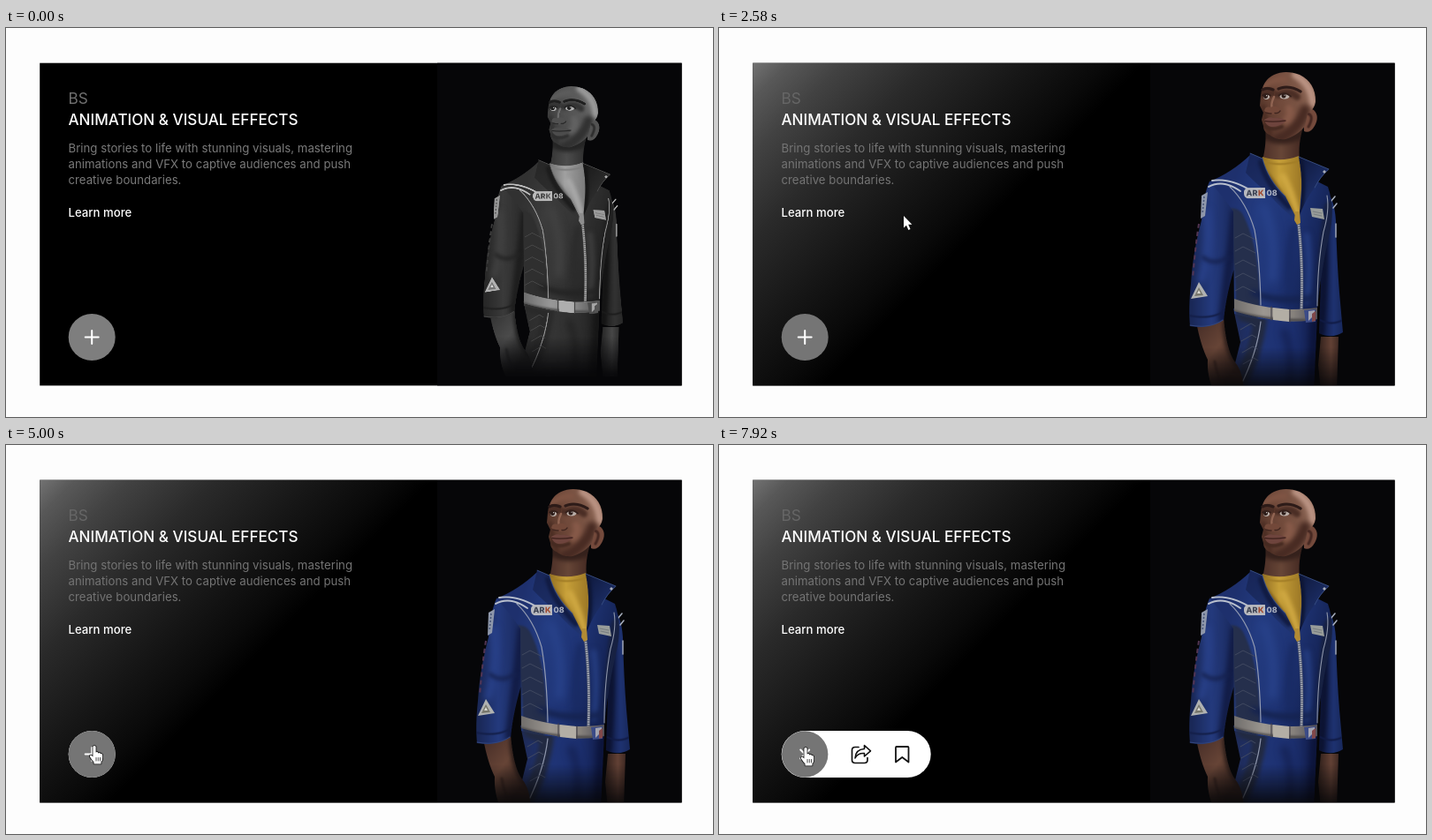
An HTML page with a canvas that plays this animation: 800 px wide and 441 px high, repeating every 8000 ms.

```html
<!DOCTYPE html>
<html lang="en">
<head>
<meta charset="utf-8">
<title>Card hover</title>
<style>
  html, body { margin: 0; width: 100%; height: 100%; overflow: hidden; background: #fdfdfd; }
  canvas { display: block; width: 800px; height: 441px; }
</style>
</head>
<body>
<canvas id="stage"></canvas>
<script>
const W = 800, H = 441, LOOP = 8000;
const FONT = 'Inter, "Open Sans", sans-serif';
const CARD = { x: 38.2, y: 39.7, w: 726.4, h: 365.7, split: 488 };
const BUTTON = { x: 97.2, y: 350.5, r: 26.5 };
const ZOOM = 1.1, PIVOT = { x: 619, y: 226 };

const dpr = window.devicePixelRatio || 1;
const canvas = document.getElementById('stage');
canvas.width = W * dpr;
canvas.height = H * dpr;
const ctx = canvas.getContext('2d');

const clamp = v => Math.max(0, Math.min(1, v));
const mix = (a, b, p) => a + (b - a) * p;
const ease = (t, start, length) => {
  const p = clamp((t - start) / length);
  return p * p * (3 - 2 * p);
};
const grey = v => `rgb(${v},${v},${v})`;

function ramp(c, x0, y0, x1, y1, ...stops) {
  const g = c.createLinearGradient(x0, y0, x1, y1);
  stops.forEach(([at, color]) => g.addColorStop(at, color));
  return g;
}

function fill(c, d, color) {
  c.fillStyle = color;
  c.fill(new Path2D(d));
}

function line(c, d, color, width = 1, dash = []) {
  c.strokeStyle = color;
  c.lineWidth = width;
  c.lineCap = c.lineJoin = dash.length ? 'butt' : 'round';
  if (dash.length) c.lineJoin = 'miter';
  c.setLineDash(dash);
  c.stroke(new Path2D(d));
  c.setLineDash([]);
}

// Fill a shape, then add blurred strokes that stay inside it.
function shaded(c, d, color, strokes = []) {
  fill(c, d, color);
  c.save();
  c.clip(new Path2D(d));
  for (const [path, tone, width, blur] of strokes) {
    c.filter = `blur(${blur}px)`;
    line(c, path, tone, width);
  }
  c.restore();
}

function drawLegs(c) {
  shaded(c, 'M582 318 L590 356 L578 404 L578 412 H673 L677 324 Z',
    ramp(c, 580, 0, 680, 0, [0, '#1f2a52'], [.35, '#203577'], [.7, '#1c2f6e'], [1, '#111b45']), [
      ['M594 325 L612 332 Q607 372 586 408', '#222a42', 16, 4],
      ['M640 345 Q650 370 646 404', '#162458', 9, 8],
      ['M676 326 L671 410', '#0c143a', 12, 8]
    ]);
  line(c, 'M613 333 Q609 368 590 406', '#8f97ad', 1.2);
  for (let i = 0; i < 4; i++) line(c, `M${590 + i} ${342 + i * 13} l12 -7 l5 3`, '#434b62', .8);
}

function drawHands(c) {
  shaded(c, 'M540 333 Q545 360 553 376 Q552 395 560 412 H594 Q593 390 584 379 Q574 366 571 329 Z',
    ramp(c, 540, 340, 590, 380, [0, '#4a3029'], [.5, '#674537'], [1, '#34221d']), [
      ['M574 335 Q575 370 592 386', '#2a1c19', 9, 5],
      ['M561 378 Q563 392 570 404', '#3c2720', 3, 2]
    ]);
  shaded(c, 'M681 350 L678 382 L681 412 H699 L701 350 Z',
    ramp(c, 678, 0, 702, 0, [0, '#2e1f1a'], [.6, '#624135'], [1, '#3d2822']));
}

function drawArms(c) {
  shaded(c, 'M555 174 Q548 190 546 218 Q536 255 534 290 Q531 318 533 338 Q555 342 571 331 Q574 300 585 266 L592 190 Z',
    ramp(c, 535, 0, 590, 0, [0, '#1a2857'], [.4, '#243a7d'], [1, '#182656']), [
      ['M584 210 Q579 260 570 330', '#121c46', 10, 6],
      ['M552 208 Q557 250 546 285', '#284088', 9, 7],
      ['M548 260 Q560 270 576 260', '#16224f', 4, 4],
      ['M532 326 Q556 331 572 321', '#141f49', 2, 1]
    ]);
  line(c, 'M533 337 Q556 341 570 331', '#33477e', .9);

  shaded(c, 'M684 182 Q696 190 698 218 Q699 262 702 300 L706 345 Q693 353 679 346 L681 290 Z',
    ramp(c, 680, 0, 706, 0, [0, '#0f183f'], [.6, '#1e3270'], [1, '#18285c']), [
      ['M685 230 Q686 290 681 345', '#0c1331', 8, 5],
      ['M680 331 Q693 338 706 331', '#111b45', 2, 1]
    ]);
  line(c, 'M692 197 L697 191 M695 204 L699 199', '#a9b0bf', 1.5);
  line(c, 'M698 222 V237', '#98a0b2', 1.6);

  // Sleeve marks and patches
  fill(c, 'M546 190 L553 186 L550 213 L545 216 Z', '#8f98ab');
  line(c, 'M549 191 L547 211', '#4b597a', 1.6, [2, 2]);
  line(c, 'M543 222 Q539 247 536 284', '#523553', 2, [5, 4]);
  fill(c, 'M543 288 L553 304 L534 307 Z', '#b0b2b1');
  fill(c, 'M543 294 L548 303 L538 304 Z', '#77776c');
  fill(c, 'M543 297 l2 4 h-4 Z', '#d8d8d2');
}

function drawTorso(c) {
  shaded(c, 'M601 144 Q580 164 555 174 Q568 188 582 208 L583 324 Q630 337 676 326 Q681 275 690 237 Q698 206 689 180 L661 166 Z',
    ramp(c, 580, 180, 695, 210, [0, '#1e306d'], [.3, '#243c81'], [.65, '#1f3475'], [1, '#142252']), [
      ['M581 218 Q600 255 598 322', '#252f4c', 27, 2],
      ['M694 205 Q685 260 686 320', '#172142', 19, 3],
      ['M650 228 Q642 265 648 314', '#192b64', 8, 7],
      ['M617 205 Q630 235 626 284', '#28428a', 10, 9],
      ['M665 235 Q670 270 665 310', '#253d80', 7, 6],
      ['M605 300 Q630 312 672 306', '#152350', 7, 6]
    ]);
  line(c, 'M578 180 Q597 198 606 229 Q612 263 613 314', '#949cb2', 1.2);
  line(c, 'M688 190 Q691 207 684 231 Q677 269 677 315', '#8d95aa', 1.1);
  for (let i = 0; i < 5; i++) line(c, `M584 ${238 + i * 15} l9 -5 l14 7`, '#434b62', .8);
  line(c, 'M554 180 Q570 171 590 185 M558 173 Q577 170 598 182', '#b9c0ce', 1.9);
}

function drawNeck(c) {
  shaded(c, 'M618 113 Q620 130 615 150 Q637 157 657 149 Q655 132 661 112 Z',
    ramp(c, 615, 0, 662, 0, [0, '#4c3028'], [.45, '#674637'], [1, '#402620']),
    [['M619 121 Q636 132 660 119', '#35211c', 11, 5]]);
  shaded(c, 'M615 146 Q636 153 656 145 L660 170 L656 221 L640 199 L612 158 Z',
    ramp(c, 615, 0, 662, 0, [0, '#937023'], [.4, '#c7a039'], [1, '#987424']), [
      ['M615 151 Q636 158 658 150', '#a27d27', 2, 1],
      ['M638 168 Q649 187 655 214', '#cfa842', 7, 5],
      ['M614 159 Q638 186 650 215', '#7e5d1d', 5, 3]
    ]);
}

function drawCollar(c) {
  shaded(c, 'M601 142 L615 148 Q621 172 641 191 L655 219 Q636 205 622 188 Q605 174 596 164 Z',
    ramp(c, 598, 145, 650, 210, [0, '#182658'], [1, '#20346f']),
    [['M613 152 Q619 176 645 203', '#111b42', 6, 3]]);
  shaded(c, 'M656 146 L690 160 Q680 169 674 181 Q661 198 655 219 Q663 183 656 146 Z',
    ramp(c, 655, 150, 690, 180, [0, '#101a3e'], [1, '#1e316c']),
    [['M658 150 Q664 180 657 214', '#0d1534', 5, 3]]);
  line(c, 'M601 142 L615 148 Q621 172 641 191 M656 146 L690 160 Q680 169 674 181', '#3b5186', .8);
  fill(c, 'M683 163 l2 -2 l2 2 l-2 2 Z', '#a9aebb');
}

function drawTrim(c) {
  line(c, 'M655 216 Q661 262 659 319', '#444d66', 3.6);
  line(c, 'M655 216 Q661 262 659 319', '#adb1bb', 2.6, [1.5, 1]);
  fill(c, 'M652 208 h5 l1 13 l-4 2 l-3 -5 Z', '#b18b34');

  // Chest labels
  c.save();
  c.translate(612, 187);
  c.rotate(-.01);
  c.fillStyle = '#b9babf';
  c.beginPath();
  c.roundRect(-18, -6, 24, 12, [5, 0, 0, 5]);
  c.fill();
  c.font = `800 9px ${FONT}`;
  c.textBaseline = 'middle';
  c.fillStyle = '#3b4152';
  c.fillText('AR', -15.5, .5);
  c.fillStyle = '#a04a30';
  c.fillText('K', -2, .5);
  c.fillStyle = '#aab0c0';
  c.fillText('08', 7.5, .5);
  c.restore();
  fill(c, 'M669 204 L683 205 L685 217 L671 214 Z', '#999d9a');
  line(c, 'M672 208 L682 210 M673 211 L682 213', '#777d80', 1);

  // Belt
  shaded(c, 'M583 307 Q612 317 645 319 Q664 319 677 317 V330 Q658 334 636 332 Q607 328 583 321 Z',
    ramp(c, 583, 0, 678, 0, [0, '#716e6c'], [.35, '#9c9791'], [.7, '#87827d'], [1, '#504e56']),
    [['M583 321 Q620 333 677 331', '#4e4b4b', 3, 2]]);
  fill(c, 'M627 317 L645 319 V333 L627 331 Z', '#b3aea5');
  line(c, 'M625 316 V331 M646 319 V333', '#45434a', 1.2);
  fill(c, 'M662 320 L675 319 V333 L664 334 Z', '#3b4b87');
  fill(c, 'M667 321 L674 320 V325 L667 332 Z', '#a3a4b0');
  fill(c, 'M671 324 L675 321 V332 L671 333 Z', '#80484a');
}

function drawHead(c) {
  const ear = 'M661 96 Q667 89 673 93 Q680 100 674 111 Q669 120 662 117 Z';
  shaded(c, ear, '#744a3c', [['M666 97 Q674 99 667 112', '#452822', 3, 1]]);

  const skin = ramp(c, 612, 92, 676, 73, [0, '#57372b'], [.35, '#714a3b'], [.7, '#7d5747'], [1, '#96705f']);
  shaded(c, 'M613 77 Q615 59 628 53 Q641 47 657 53 Q675 62 675 83 Q674 92 666 97 L663 111 Q656 121 641 126 Q630 127 623 121 Q616 118 616 111 L614 104 L616 96 L612 88 Z',
    skin, [
      ['M652 53 Q671 64 672 86', '#bb9484', 8, 5],
      ['M616 67 Q626 58 640 58', '#805544', 7, 5],
      ['M663 93 Q657 115 632 126', '#482b23', 12, 6],
      ['M616 89 Q618 108 624 122', '#4b2d23', 5, 4],
      ['M645 91 Q649 98 642 105', '#875a49', 8, 5],
      ['M615 75 Q621 71 629 75 M634 76 Q645 70 654 78', '#4b2e25', 8, 3],
      ['M617 111 Q625 117 637 112', '#452a21', 4, 2]
    ]);

  for (const [x, y, rx] of [[619.5, 78, 3.6], [640, 77.5, 5.5]]) {
    c.fillStyle = '#b9aea8';
    c.beginPath();
    c.ellipse(x, y, rx, 3, -.04, 0, 7);
    c.fill();
    c.fillStyle = '#2b1b17';
    c.beginPath();
    c.arc(x - 1, y - .5, 2.5, 0, 7);
    c.fill();
    c.fillStyle = '#eee';
    c.fillRect(x - .5, y - 1.8, 1, 1);
  }
  line(c, 'M615 76.5 Q619 73 624 76.5 M633.5 76.5 Q640 71.5 647 77.5', '#34201b', 1.8);
  line(c, 'M615 70 Q620 67 627 70 M633 69 Q645 64 658 72', '#2d1b18', 3.2);
  line(c, 'M629 73 Q627 83 625 90', '#573529', 1.5);
  line(c, 'M628 78 Q624 87 626 91', '#906452', 2.5);
  fill(c, 'M617 94 Q618 88 624 90 Q629 87 634 91 Q637 96 631 97 Q624 100 617 94 Z', '#724839');
  line(c, 'M619 96 Q623 97 625 97 M629 96.5 Q633 97 635 94', '#3f251f', 1.4);
  fill(c, 'M617 104 Q623 100 627 102 Q634 101 642 105 Q635 112 625 112 Q619 111 617 104 Z', '#6e443d');
  line(c, 'M618 105.5 Q628 107 641 105', '#3b1f1b', 1.2);
}

// The figure is drawn once, at its hovered size.
const BOX = { x: 488, y: 40, w: 277, h: 380 };
const DETAIL = 2 * dpr;
const figure = document.createElement('canvas');
figure.width = BOX.w * DETAIL;
figure.height = BOX.h * DETAIL;

function buildFigure() {
  const c = figure.getContext('2d');
  c.scale(DETAIL, DETAIL);
  c.translate(-BOX.x, -BOX.y);
  for (const part of [drawLegs, drawHands, drawArms, drawTorso, drawNeck, drawCollar, drawTrim, drawHead]) part(c);
  c.globalCompositeOperation = 'destination-out';
  c.fillStyle = ramp(c, 0, 362, 0, 409, [0, 'rgba(0,0,0,0)'], [1, 'rgba(0,0,0,.92)']);
  c.fillRect(BOX.x, 350, BOX.w, 80);
}

function text(str, x, y, size, weight, color, spacing = 0) {
  ctx.font = `${weight} ${size}px ${FONT}`;
  ctx.letterSpacing = spacing + 'px';
  ctx.fillStyle = color;
  ctx.fillText(str, x, y);
}

function drawCard(hover) {
  const right = CARD.x + CARD.w - CARD.split;
  ctx.fillStyle = '#000';
  ctx.fillRect(CARD.x, CARD.y, CARD.w, CARD.h);
  ctx.globalAlpha = hover ** 1.7;
  ctx.fillStyle = ramp(ctx, 38, 40, 260, 262, [0, '#727272'], [.09, '#585858'], [.23, '#424242'],
    [.45, '#2a2a2a'], [.7, '#171717'], [.9, '#090909'], [1, '#000']);
  ctx.fillRect(CARD.x, CARD.y, CARD.split - CARD.x, CARD.h);
  ctx.globalAlpha = 1;
  ctx.fillStyle = '#060608';
  ctx.fillRect(CARD.split, CARD.y, right, CARD.h);

  ctx.save();
  ctx.beginPath();
  ctx.rect(CARD.split, CARD.y, right, CARD.h);
  ctx.clip();
  const scale = mix(1 / ZOOM, 1, hover);
  ctx.translate(PIVOT.x, PIVOT.y);
  ctx.scale(scale, scale);
  ctx.translate(-PIVOT.x, -PIVOT.y);
  ctx.filter = `grayscale(${1 - hover})`;
  ctx.drawImage(figure, BOX.x, BOX.y, BOX.w, BOX.h);
  ctx.restore();

  const body = grey(mix(122, 116, hover));
  text('BS', 70.5, 86, 17.2, 400, grey(mix(112, 102, hover)));
  text('ANIMATION & VISUAL EFFECTS', 70.5, 110, 17.1, 500, '#fff');
  text('Bring stories to life with stunning visuals, mastering', 70.5, 140.5, 13.2, 400, body, .03);
  text('animations and VFX to captive audiences and push', 70.5, 158.8, 13.2, 400, body, .03);
  text('creative boundaries.', 70.5, 177, 13.2, 400, body, .03);
  text('Learn more', 70.5, 213.5, 13.2, 500, '#fff');
}

function drawMenu(open, hover) {
  const { x, y, r } = BUTTON;
  if (open > 0) {
    ctx.save();
    ctx.fillStyle = '#fff';
    ctx.beginPath();
    ctx.roundRect(x - r, y - r, mix(2 * r, 169, open), 2 * r, r);
    ctx.fill();
    ctx.clip();
    ctx.globalAlpha = open;
    line(ctx, 'M158 342.5 H154 Q150.5 342.5 150.5 346 V357 Q150.5 360.5 154 360.5 H164.5 Q168 360.5 168 357 V354.5', '#111', 1.7);
    line(ctx, 'M164.5 340.5 L171.5 346.8 L164.5 353 V349.5 Q157 349 154 355 Q154.5 345 164.5 344.5 Z', '#111', 1.6);
    line(ctx, 'M201 342 H213.5 Q214.5 342 214.5 343 V359.5 L207.3 354 L200 359.5 V343 Q200 342 201 342 Z', '#111', 1.8);
    ctx.restore();
  }
  ctx.fillStyle = grey(mix(126, 117, hover));
  ctx.beginPath();
  ctx.arc(x, y, r - .3 * open, 0, 7);
  ctx.fill();
  ctx.save();
  ctx.translate(x, y);
  ctx.rotate(open * Math.PI / 4);
  const arm = mix(7.5, 7, open);
  line(ctx, `M${-arm} 0 H${arm} M0 ${-arm} V${arm}`, '#fff', 2);
  ctx.restore();
}

// time, x, y of the pointer tip
const PATH = [
  [1250, 116, -24], [1600, 133, 92], [1830, 144, 134], [2300, 203, 204], [2580, 209, 213],
  [3300, 211, 238], [4080, 203, 276], [4600, 122, 332], [4850, 100, 341], [6000, 100, 341],
  [6600, 101, 288], [7000, 100, 275], [7450, 100, 275], [7850, 98, 343], [8000, 98, 343]
];

const slope = (i, k) => (PATH[i + 1][k] - PATH[i][k]) / (PATH[i + 1][0] - PATH[i][0]);

function tangent(i, k) {
  if (i === 0) return slope(0, k);
  if (i === PATH.length - 1) return 0;
  const a = slope(i - 1, k), b = slope(i, k);
  return a * b <= 0 ? 0 : 2 * a * b / (a + b);
}

function pointer(t) {
  let i = 0;
  while (i < PATH.length - 2 && t > PATH[i + 1][0]) i++;
  const [a, b] = [PATH[i], PATH[i + 1]], span = b[0] - a[0];
  const p = (t - a[0]) / span, q = 1 - p;
  return [1, 2].map(k => q * q * (1 + 2 * p) * a[k] + p * p * (3 - 2 * p) * b[k]
    + span * (p * q * q * tangent(i, k) - p * p * q * tangent(i + 1, k)));
}

const ARROW = 'M0 0 V13.5 L3 10.6 L5.4 16 L7.5 15 L5.2 9.7 H9.4 Z';
const HAND = 'M-1.6 1 Q0 -1.4 1.6 1 V7.5 Q3.6 6.3 4.4 8.4 Q6.3 7.2 7 9.2 Q9.2 8.4 9.2 11 V14 Q9.2 17 7.5 18 V20.5 H-.5 V18.5 Q-2.5 16.5 -5 12.5 Q-5.5 10 -3.3 10.7 L-1.6 12.5 Z';

function drawPointer(t) {
  if (t < PATH[0][0]) return;
  const [x, y] = pointer(t);
  const over = Math.hypot(x - BUTTON.x, y - BUTTON.y) < BUTTON.r;
  const shape = over ? HAND : ARROW;
  ctx.save();
  ctx.translate(x, y);
  line(ctx, shape, '#111', 1.6);
  fill(ctx, shape, '#fff');
  if (over) line(ctx, 'M2 13.5 V17 M4.3 13.5 V17 M6.5 13.5 V17', '#222', .8);
  ctx.restore();
}

function draw(t) {
  ctx.setTransform(dpr, 0, 0, dpr, 0, 0);
  ctx.fillStyle = '#fdfdfd';
  ctx.fillRect(0, 0, W, H);
  const hover = ease(t, 1530, 620);
  drawCard(hover);
  drawMenu(ease(t, 5000, 420), hover);
  drawPointer(t);
}

buildFigure();
const start = performance.now();
function tick() {
  draw((performance.now() - start) % LOOP);
  requestAnimationFrame(tick);
}
tick();
</script>
</body>
</html>
```
